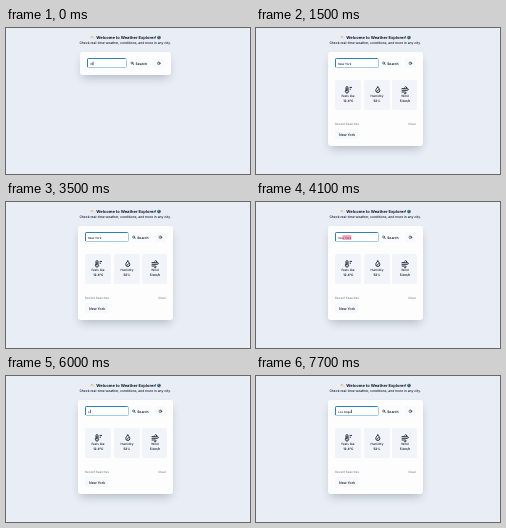
Animation, 244 px wide and 146 px high, one loop 8 s. Source, as an HTML page:

```html
<!DOCTYPE html>
<html lang="en">
<head>
<meta charset="utf-8">
<title>Weather search</title>
<style>
  html, body { margin: 0; width: 100%; height: 100%; overflow: hidden; background: #e9edf5; }
  svg { display: block; width: 100vw; height: 100vh; }
  text { font-family: Inter, Roboto, sans-serif; font-weight: 500; fill: #0f172a; text-rendering: geometricPrecision; white-space: pre; }
  .mid { text-anchor: middle; }
  .bold { font-weight: 700; }
  .semi { font-weight: 600; }
  .icon { fill: none; stroke: #0f1b2d; stroke-width: .9; stroke-linecap: round; stroke-linejoin: round; }
  .soft { fill: #f1f4f9; }
  .muted { fill: #7b8696; }
</style>
</head>
<body>
<svg viewBox="0 0 244 146" xmlns="http://www.w3.org/2000/svg">
  <defs>
    <filter id="blur" x="-30%" y="-100%" width="160%" height="300%">
      <feGaussianBlur stdDeviation="4.7"/>
    </filter>
  </defs>
  <rect width="244" height="146" fill="#e9edf5"/>

  <circle cx="86" cy="9.2" r="1.3" fill="#f5b942"/>
  <path d="M85.6 11h3.2a.9.9 0 0 0 0-1.8a1.4 1.4 0 0 0-2.6.2a.8.8 0 0 0-.6 1.6z" fill="#dce4ee"/>
  <text class="mid bold" x="120.4" y="11.2" font-size="4.05">Welcome to Weather Explorer!</text>
  <circle cx="153" cy="9.6" r="1.8" fill="#35597c"/>
  <path d="M152 8.4l1.2-.3.4 1-.9.7zM153.2 10.2l.9-.2-.5 1z" fill="#79a68a"/>
  <text class="mid" x="119.2" y="16.3" font-size="3.3">Check real-time weather, conditions, and more in any city.</text>

  <rect id="shade" y="31" rx="2" fill="#1e293b" opacity=".28" filter="url(#blur)"/>
  <rect id="card" y="24" rx="2.4" fill="#fdfdfe"/>

  <rect id="field" y="30.5" height="9" rx="1" fill="#fff" stroke="#a3cbe2"/>
  <path id="ring" fill="none" stroke="#2f7fb0"/>
  <rect id="mark" y="33" height="5" fill="#f7a9c0"/>
  <text id="typed" y="36.5" font-size="2.85"></text>
  <rect id="caret" y="33.7" width=".6" height="3.4" fill="#0f172a"/>

  <g id="buttons">
    <rect x="122.7" y="30.3" width="21.5" height="10" rx="1.4" fill="#fafbfd"/>
    <circle class="icon" cx="126" cy="35" r="1.05" style="stroke-width:.5"/>
    <path class="icon" d="M126.8 35.8l.9.9" style="stroke-width:.6"/>
    <text class="semi" x="129.6" y="36.7" font-size="3.35">Search</text>
    <rect x="147" y="30.3" width="11.5" height="10" rx="1.4" fill="#f7f9fc"/>
    <circle class="icon" cx="152.8" cy="35.3" r="1.35" style="stroke-width:.5"/>
    <path class="icon" d="M152.8 34.5v.8h.6" style="stroke-width:.4"/>
  </g>

  <g id="result">
    <rect class="soft" x="79" y="52" width="26" height="30" rx="1.8"/>
    <rect class="soft" x="108" y="52" width="26" height="30" rx="1.8"/>
    <rect class="soft" x="136" y="52" width="25" height="30" rx="1.8"/>

    <path class="icon" d="M90 62.2v-2.6a1 1 0 0 1 2 0v2.6a1.6 1.6 0 1 1-2 0zM91 60.5v2.6M94 59.4h1.6M94 61.2h.6"/>
    <path class="icon" d="M121.8 59c1.3 1.6 2 2.4 2 3.5a2 2 0 0 1-4 0c0-1.1.7-1.9 2-3.5zM121 63.3l1.6-1.6"/>
    <path class="icon" d="M146 60.6h3.6a1 1 0 1 0-.9-1.5M146 62.3h5.2a1 1 0 1 0-.9-1.5M146 64h3.2a.9.9 0 1 1-.8 1.3"/>

    <g class="mid" font-size="3">
      <text x="92" y="69.4">Feels like</text>
      <text x="121" y="69.4">Humidity</text>
      <text x="149" y="69.4">Wind</text>
      <g font-size="3.2">
        <text class="semi" x="92.3" y="74">12.4°C</text>
        <text class="semi" x="121" y="74">52%</text>
        <text class="semi" x="149" y="74">5 km/h</text>
      </g>
    </g>

    <text class="muted" x="79" y="96.8" font-size="3">Recent Searches</text>
    <text class="muted mid" x="156" y="96.8" font-size="3">Clear</text>
    <rect x="79" y="101" width="23.2" height="10" rx="1.5" fill="#f6f8fb"/>
    <text x="83" y="107.5" font-size="3.5">New York</text>
  </g>
</svg>
<script>
const LOOP = 8000, OPEN = 1500;
const FIRST = "New York", SECOND = "Los Angeles";

// [time, letters shown] for each word
const firstKeys = [[0, 1], [100, 2], [200, 3], [300, 4], [500, 5], [700, 6], [1000, 8]];
const secondKeys = [[5200, 1], [6500, 2], [6600, 3], [6700, 4], [6800, 5], [7400, 6], [7500, 7], [7600, 8]];
const hidden = [[1500, 2000], [2500, 3000], [3500, 5200], [5500, 6000], [7100, 7400]];

const $ = id => document.getElementById(id);
const set = (id, attrs) => {
  for (const key in attrs) $(id).setAttribute(key, attrs[key]);
};
const show = (id, on) => set(id, { visibility: on ? "visible" : "hidden" });
const letters = (keys, t) => keys.reduce((n, [at, count]) => t >= at ? count : n, 0);

function draw(t) {
  const open = t >= OPEN;
  const card = open ? { x: 72, width: 95, height: 94 } : { x: 74, width: 91, height: 23 };
  const left = open ? 79.5 : 81.5;
  const width = open ? 43 : 39;
  const textX = open ? 82.2 : 84.4;

  set("card", card);
  set("shade", { x: card.x + 2.3, width: card.width - 4.6, height: card.height - 4.6 });
  set("field", { x: left, width });
  set("ring", { d: `M${left} 39V31.5q0-1 1-1H${left + width - 1}` });
  set("buttons", { transform: `translate(${open ? 1.6 : 0} 0)` });
  show("result", open);

  const word = t < 5200
    ? FIRST.slice(0, letters(firstKeys, t))
    : SECOND.slice(0, letters(secondKeys, t));
  const typed = $("typed");
  typed.textContent = word;
  set("typed", { x: textX });
  const size = typed.getComputedTextLength();

  // selection is dragged from the end of the word to its start
  const selected = t >= 4000 && t < 5200;
  const part = Math.min(1, (Math.floor((t - 4000) / 100) + 1) / 3);
  show("mark", selected);
  if (selected) set("mark", { x: textX + size * (1 - part), width: size * part });
  typed.style.fill = selected ? "#6b2440" : "#0f172a";

  show("caret", !hidden.some(([from, to]) => t >= from && t < to));
  set("caret", { x: textX + size + .2 });
}

const start = performance.now();
function tick() {
  draw((performance.now() - start) % LOOP);
  requestAnimationFrame(tick);
}
tick();
</script>
</body>
</html>
```
